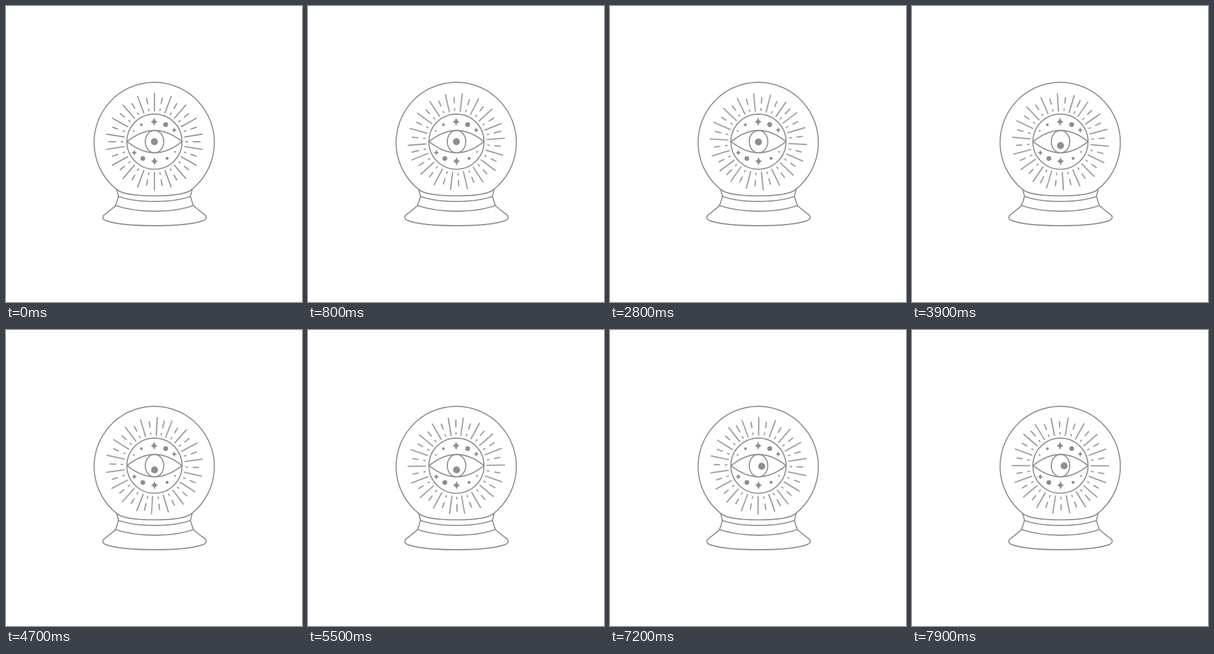
An HTML page for the animation above (8 s loop, 512 by 512 pixels).

```html
<!DOCTYPE html>
<html lang="en">
<head>
<meta charset="utf-8">
<title>Crystal ball</title>
<style>
  html, body { margin: 0; width: 100%; height: 100%; overflow: hidden; background: #fff; }
  svg { display: block; width: 100vw; height: 100vh; }
  .line { fill: none; stroke: #8d8e91; stroke-width: 1.9; stroke-linecap: round; stroke-linejoin: round; }
  .fill { fill: #8d8e91; }
  #rays {
    transform-origin: 256.7px 234.8px;
    animation: spin 8s steps(80, end) infinite;
  }
  #pupil { animation: look 8s ease-in-out infinite; }
  @keyframes spin { to { transform: rotate(-132deg); } }
  /* rest, glance down, rest, glance right */
  @keyframes look {
    0%, 31.25% { transform: translate(0, 0); }
    52.5%, 73.75% { transform: translate(.2px, 7.2px); }
    95%, 100% { transform: translate(6.4px, .2px); }
  }
</style>
</head>
<body>
<svg viewBox="0 0 512 512">
  <g class="line">
    <path d="M191.5 317.3A104 104 0 1 1 321.3 317.3"/>
    <path d="M191.5 317.3C201 326 228 328.4 256.5 328.4S312 326 321.3 317.3"/>
    <path d="M191.5 317.3L194.6 329.3Q192.6 337 189.4 345.2"/>
    <path d="M322 317.3L319 329.3Q321 337 324.2 345.2"/>
    <path d="M194.6 329.3C212 335.5 233 338 256.8 338S302 335.5 319 329.3"/>
    <path d="M189.4 345.2C209 352 232 355 256.8 355S305 352 324.2 345.2"/>
    <path d="M189.4 345.2C183 351.5 174 357.5 168.5 362.5C166.5 366 167.5 369 172 371C190 377.5 225 380 256.8 380S324 377.5 341.6 371C346 369 347.2 366 345.4 362.5C340 357.5 330.5 351.5 324.2 345.2"/>
    <circle cx="256.8" cy="234.7" r="47.7"/>
    <path d="M209.4 234.6C225 222 240 215.2 257 215.2S289 222 304.6 234.6C289 247 274 254 257 254S225 247 209.4 234.6Z"/>
    <ellipse cx="256.9" cy="234.6" rx="16" ry="19.4"/>
    <g id="rays"></g>
  </g>
  <g class="fill" id="sky">
    <circle cx="276.2" cy="205.2" r="4.1"/>
    <circle cx="236.7" cy="263.8" r="4.1"/>
    <circle cx="234.2" cy="205.4" r="2.3"/>
    <circle cx="278.6" cy="263.6" r="2.5"/>
    <circle cx="220.8" cy="216.2" r="1.4"/>
    <circle cx="292.4" cy="252.2" r="1.5"/>
    <circle id="pupil" cx="256.7" cy="234.7" r="6.1"/>
  </g>
</svg>
<script>
  const CX = 256.7, CY = 234.8;

  function addPath(parent, d) {
    const path = document.createElementNS('http://www.w3.org/2000/svg', 'path');
    path.setAttribute('d', d);
    parent.appendChild(path);
  }

  const rays = document.getElementById('rays');
  function ray(deg, from, to) {
    const a = deg * Math.PI / 180;
    const at = r => `${CX + r * Math.sin(a)} ${CY - r * Math.cos(a)}`;
    addPath(rays, `M${at(from)}L${at(to)}`);
  }

  function dashed(deg, end) {
    ray(deg, 54.5, 57.5);
    ray(deg, 67, end);
  }

  // Two mirrored fans, leaving slightly narrower gaps at the sides.
  const STEP = 20.25;
  for (const base of [0, 180]) {
    for (let k = -4; k <= 4; k++) {
      ray(base + k * STEP, 53, 83.5);
      if (k < 4) dashed(base + (k + .5) * STEP, 76.5);
    }
    dashed(base + 90, 79);
  }

  const sky = document.getElementById('sky');
  function star(x, y, w, h, waist) {
    addPath(sky, `M${x} ${y - h}Q${x + waist} ${y - waist} ${x + w} ${y}` +
      `Q${x + waist} ${y + waist} ${x} ${y + h}` +
      `Q${x - waist} ${y + waist} ${x - w} ${y}` +
      `Q${x - waist} ${y - waist} ${x} ${y - h}Z`);
  }
  star(256.2, 200.3, 6.2, 7.8, 1.2);
  star(256.9, 268.5, 6.2, 7.8, 1.2);
  star(291, 214.6, 4.6, 5.2, .8);
  star(222, 253.8, 4.6, 5.2, .8);
</script>
</body>
</html>
```
